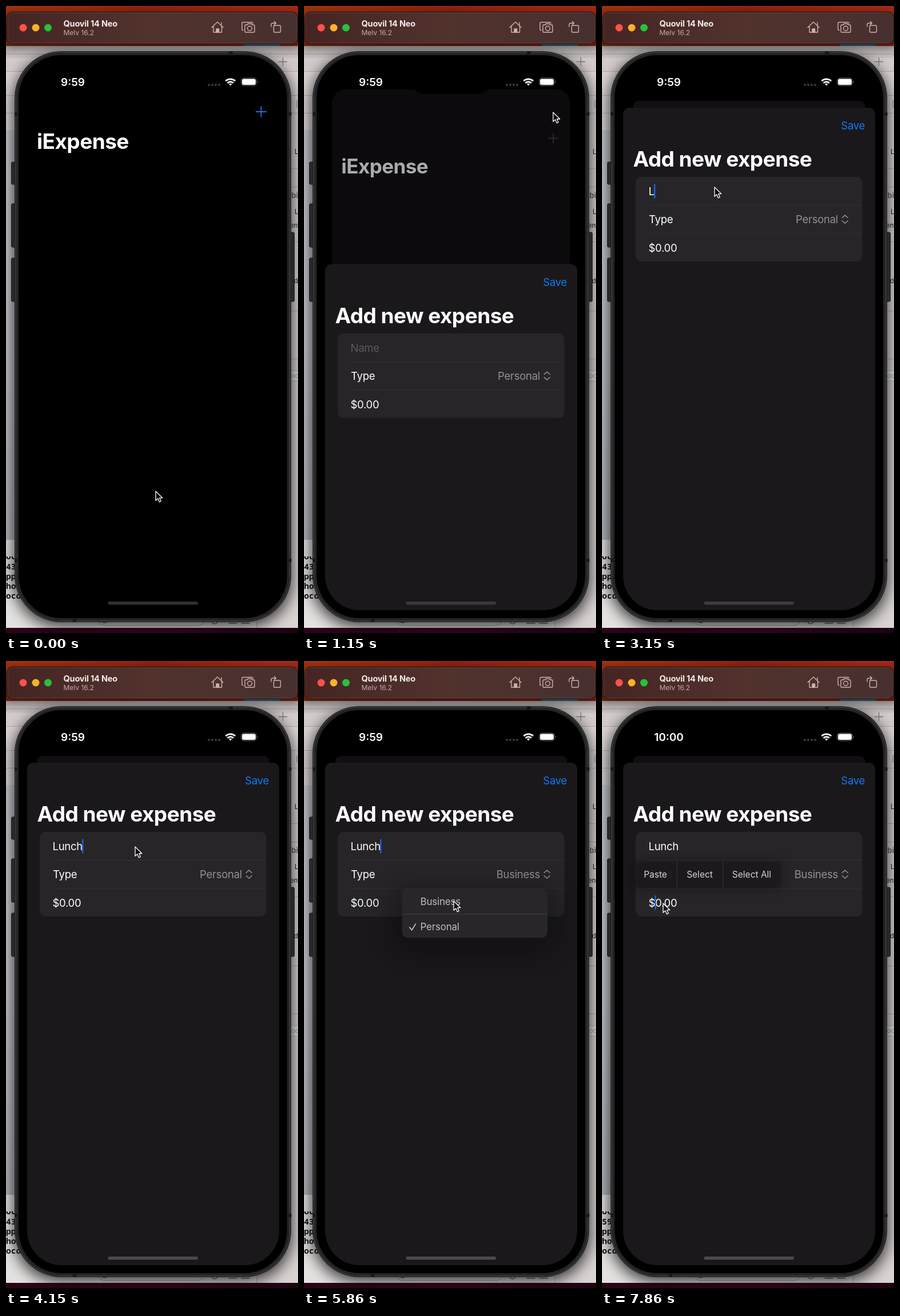
These frames come from a looping animation (511 by 1097 pixels, 8000 ms). An HTML page:

```html
<!DOCTYPE html>
<html lang="en">
<head>
<meta charset="utf-8">
<title>Expense form</title>
<style>
  html, body { margin: 0; width: 100%; height: 100%; overflow: hidden; background: #000; }
  svg { display: block; width: 511px; height: 1097px; font-family: Inter, Roboto, sans-serif; }
  .title { font-size: 37px; font-weight: 700; letter-spacing: -.0145em; fill: #fff; }
  .body { font-size: 18.5px; letter-spacing: -.015em; fill: #fff; }
  .edit { font-size: 15.5px; fill: #d6d5d8; text-anchor: middle; }
  .log { font: 700 14.5px "Noto Sans Mono", "DejaVu Sans Mono", monospace; fill: #151515; }
  .side { font-size: 11.5px; fill: #1c1c1c; }
  .line { fill: none; stroke-linecap: round; stroke-linejoin: round; }
</style>
</head>
<body>
<svg viewBox="0 0 511 1097" xmlns="http://www.w3.org/2000/svg">
  <defs>
    <linearGradient id="wall"><stop stop-color="#a13310"/><stop offset=".5" stop-color="#8f220e"/><stop offset="1" stop-color="#a52a16"/></linearGradient>
    <linearGradient id="bar"><stop stop-color="#452523"/><stop offset=".5" stop-color="#51322d"/><stop offset="1" stop-color="#46302f"/></linearGradient>
    <linearGradient id="canvas" x2="0" y2="1"><stop stop-color="#c6c7ce"/><stop offset=".5" stop-color="#c4c5cc"/><stop offset="1" stop-color="#b4b5bc"/></linearGradient>
    <linearGradient id="dock"><stop stop-color="#2b0417"/><stop offset=".55" stop-color="#3a0620"/><stop offset="1" stop-color="#1c0413"/></linearGradient>
    <filter id="soft" x="-30%" y="-30%" width="160%" height="160%"><feGaussianBlur stdDeviation="13"/></filter>
    <filter id="glow" x="-40%" y="-100%" width="180%" height="300%"><feGaussianBlur stdDeviation="10"/></filter>
    <filter id="haze" x="-40%" y="-100%" width="180%" height="300%"><feGaussianBlur stdDeviation="24"/></filter>
    <clipPath id="screen"><rect x="37" y="101" width="441" height="956" rx="60"/></clipPath>
    <clipPath id="console"><rect y="963" width="60" height="100"/></clipPath>
  </defs>

  <!-- desktop and editor window behind -->
  <rect width="511" height="1097" fill="url(#wall)"/>
  <rect x="416" y="60" width="63" height="12" fill="#3f7592"/>
  <rect y="70" width="511" height="1019" fill="#d9d3d2"/>
  <rect y="84" width="511" height="30" fill="#d2cbc9"/>
  <rect y="217" width="60" height="717" fill="url(#canvas)"/>
  <rect y="934" width="438" height="155" fill="#e4e2e1"/>
  <rect y="1088" width="511" height="9" fill="url(#dock)"/>
  <path d="M0 83.5H511M0 114.5H511M0 156.5H511M0 187.5H511M490 284.5H511M490 316.5H511M490 412.5H511M490 533.5H511M490 617.5H511M438.5 1070V1088" stroke="#b3acab"/>
  <path d="M160 1070q2 14 14 14h160q14 0 14-14" class="line" stroke="#a9a4a3"/>
  <path d="M167 1076q4 5 9 2M360 1078q5 6 10 0M390 1080h14M412 1080h14" class="line" stroke="#666" stroke-width="1.4"/>
  <rect x="490" y="638" width="30" height="18" fill="#e6e2e2" stroke="#b9b3b3"/>
  <rect x="509" y="165" width="12" height="13" rx="3" fill="none" stroke="#777"/>
  <g class="side">
    <text x="505" y="259">L</text><text x="505" y="364">L</text>
    <text x="497" y="388">ent</text><text x="504" y="485">d</text>
    <text x="499.5" y="336" font-weight="700" style="font-size:13px;fill:#666">bi</text>
    <text x="499" y="651" style="fill:#999">oc</text>
  </g>
  <g class="log" clip-path="url(#console)">
    <text y="968">oc</text><text id="stamp" y="986"></text><text y="1003">pp</text><text y="1020">hoo</text><text y="1037">oco.</text>
  </g>

  <!-- shadows -->
  <rect x="13" y="86" width="488" height="1000" rx="82" opacity=".74" filter="url(#soft)"/>
  <rect x="-10" y="20" width="531" height="54" opacity=".62" filter="url(#soft)"/>
  <path d="M477 97.5h15M484.5 90v15" stroke="#756e6d" stroke-width="1.3"/>

  <!-- phone body -->
  <g fill="#29292b" stroke="#151515">
    <rect x="9.5" y="273" width="10" height="39" rx="2"/><rect x="9.5" y="346" width="10" height="76" rx="2"/>
    <rect x="9.5" y="441" width="10" height="76" rx="2"/><rect x="494" y="396" width="10.5" height="121" rx="2"/>
  </g>
  <rect x="15" y="79" width="484" height="999" rx="82" fill="#1a1a1b"/>
  <rect x="17" y="81" width="480" height="995" rx="80" fill="#000" stroke="#39393b" stroke-width="2"/>
  <rect x="20" y="84" width="474" height="989" rx="77" fill="#000" stroke="#242426" stroke-width="4"/>
  <path d="M390 82.5h7M117 1075h6M17.5 186v6M497 186v6M17.5 967v6M497 967v6" stroke="#171717" stroke-width="5"/>

  <!-- screen -->
  <g clip-path="url(#screen)">
    <g id="home">
      <rect id="homeCard" x="37" y="101" width="441" height="956"/>
      <g id="homeContent">
        <path id="plus" d="M437 185h19M446.5 175.500v19" stroke-width="1.9"/>
        <text id="homeTitle" class="title" x="54" y="250">iExpense</text>
      </g>
    </g>
    <g id="sheet">
      <rect x="37" y="178" width="441" height="900" rx="11" fill="#1a181b"/>
      <text class="body" x="460" y="216" text-anchor="end" style="fill:#0c7bf5">Save</text>
      <text class="title" x="54.5" y="281">Add new expense</text>
      <rect x="59" y="299" width="396.5" height="148" rx="10" fill="#272528"/>
      <path d="M82 348.5H455M82 398H455" stroke="#333135"/>
      <text id="name" class="body" x="81.5" y="331"></text>
      <text class="body" x="82" y="380">Type</text>
      <text id="kind" class="body" x="413" y="380" text-anchor="end" style="fill:#929196"></text>
      <path class="line" d="M420.200 370.500l5-4.400 5 4.400M420.200 375.800l5 4.400 5-4.400" stroke="#929196" stroke-width="1.5"/>
      <text id="amount" class="body" x="81.5" y="430">$0.00</text>
      <g id="picker">
        <rect x="140" y="395" width="310" height="125" rx="30" opacity=".3" filter="url(#haze)"/>
        <rect x="164" y="398" width="263" height="89.5" rx="11" fill="#29272a"/>
        <path d="M164 444.5H427" stroke="#434145"/>
        <g style="font-size:17.5px" fill="#c3c2c5" letter-spacing="-.2">
          <text x="197" y="428">Business</text><text x="197" y="474">Personal</text>
        </g>
        <path class="line" d="M177.500 468.500l4 5 7-11" stroke="#d0cfd2" stroke-width="1.7"/>
      </g>
      <g id="edit">
        <rect x="56" y="350" width="260" height="48" rx="10" opacity=".3" filter="url(#glow)"/>
        <rect x="58" y="351" width="255" height="46" rx="9" fill="#1c1a1d" opacity=".95"/>
        <path d="M131.500 351v46M211.500 351v46" stroke="#333135"/>
        <g class="edit"><text x="93.5" y="379">Paste</text><text x="171" y="379">Select</text><text x="262" y="379">Select All</text></g>
      </g>
      <rect id="caret" width="2.3" height="25" rx="1" fill="#1769e0"/>
    </g>
    <rect x="190" y="117" width="135" height="36.5" rx="18" fill="#000"/>
    <rect id="indicator" x="178.5" y="1042" width="157.5" height="5.5" rx="2.7"/>
  </g>

  <!-- status bar -->
  <text id="clock" x="117" y="140" text-anchor="middle" font-size="19" font-weight="600" fill="#fff"></text>
  <g fill="#3b3b3d"><circle cx="355" cy="138" r="2"/><circle cx="361" cy="138" r="2"/><circle cx="367" cy="138" r="2"/><circle cx="373" cy="138" r="2"/></g>
  <g fill="none" stroke="#fff" stroke-width="2.7">
    <path d="M384.400 131.300a12 12 0 0 1 16.700 0M387.600 134.700a7.500 7.500 0 0 1 10.300 0"/>
    <path d="M390 136.300q2.700-1.800 5.400 0l-2.700 3.200z" fill="#fff" stroke="none"/>
  </g>
  <rect x="411.5" y="126" width="27" height="13.5" rx="4.2" fill="none" stroke="#646466"/>
  <rect x="413" y="127.5" width="24" height="10.5" rx="3" fill="#fff"/>
  <path d="M440 130.500q2 2.200 0 4.500z" fill="#646466"/>

  <!-- simulator toolbar -->
  <rect x="2" y="10.5" width="508" height="55.5" rx="10" fill="url(#bar)" stroke="#2a1413" stroke-width="1.5"/>
  <rect x="3" y="11.5" width="506" height="53.5" rx="9" fill="none" stroke="#76544f" stroke-opacity=".6"/>
  <circle cx="30" cy="38" r="6.5" fill="#fe524b"/><circle cx="52" cy="38" r="6.5" fill="#fdb225"/><circle cx="73.5" cy="38" r="6.5" fill="#25c339"/>
  <text x="100.5" y="36" font-size="14.5" font-weight="700" letter-spacing="-.2" fill="#f4eceb">Quovil 14 Neo</text>
  <text x="100.5" y="51" font-size="12" fill="#c3aca8">Melv 16.2</text>
  <g class="line" stroke="#d0b1ac" stroke-width="1.4">
    <path d="M360 37.500l10-9.500 10 9.500M363 35.500v10.500h14.500v-10.500M377 34v-5"/>
    <path d="M368 46v-6h4.500v6z" fill="#d0b1ac"/>
    <path d="M415 42.500q-2 0-2-2v-10q0-2 2-2h15q2 0 2 2"/>
    <path d="M419 33h3l1.500-2h6l1.500 2h2.500q1.500 0 1.500 1.500v10q0 1.500-1.500 1.500h-14q-1.500 0-1.500-1.500v-10q0-1.500 1.500-1.500z"/>
    <circle cx="426.500" cy="39.3" r="4"/>
    <rect x="468.5" y="34" width="12" height="12" rx="1.5"/>
    <path d="M464 36v-3q0-3 3-3h5M469.500 27l3 3-3 3"/>
  </g>

  <path id="cursor" d="M0 0V16.200L3.800 12.700 6.300 18.800 9.200 17.500 6.700 11.700H11.800Z" fill="#080808" stroke="#fff" stroke-width="1.3" stroke-linejoin="round"/>
</svg>
<script>
  const LOOP = 8000, RATE = 7;
  const el = {};
  document.querySelectorAll('svg [id]').forEach(node => el[node.id] = node);
  const set = (node, attrs) => Object.entries(attrs).forEach(([key, value]) => node.setAttribute(key, value));
  const write = (node, text) => { if (node.textContent !== text) node.textContent = text; };
  const lerp = (a, b, p) => a + (b - a) * p;
  const clamp = p => Math.max(0, Math.min(1, p));
  const mix = (a, b, p) => `rgb(${a.map((v, i) => Math.round(lerp(v, b[i], p)))})`;

  // Critically damped spring from 0 to 1
  const spring = (t, start, speed) => {
    const x = Math.max(0, t - start) / 1000 * speed;
    return 1 - (1 + x) * Math.exp(-x);
  };

  // Pointer stops: time, x, y
  const stops = [
    [130, 262, 849], [720, 436, 186], [1140, 436, 186], [1570, 264, 390],
    [1990, 197, 317], [3990, 197, 317], [4570, 366, 364], [5150, 366, 364],
    [5570, 262, 420], [5880, 262, 420], [6430, 134, 422], [6990, 134, 422],
    [7290, 107, 424], [8000, 107, 424]
  ];
  function pointer(t) {
    const i = stops.findIndex(stop => stop[0] > t);
    if (i < 1) return stops[0].slice(1);
    const [t0, x0, y0] = stops[i - 1], [t1, x1, y1] = stops[i];
    const u = (t - t0) / (t1 - t0), p = u * u * (3 - 2 * u);
    return [lerp(x0, x1, p), lerp(y0, y1, p)];
  }

  const keyTimes = [3130, 3270, 3420, 3560, 3700];

  function drawHome(p) {
    const scale = lerp(1, .92, p), top = lerp(101, 166, p);
    set(el.home, { transform: `translate(257.5 ${top}) scale(${scale}) translate(-257.5 -101)` });
    set(el.homeCard, { rx: lerp(62, 10, p), fill: mix([0, 0, 0], [18, 15, 19], p) });
    set(el.homeContent, { transform: `translate(0 ${9.5 * p})` });
    set(el.plus, { stroke: mix([31, 112, 218], [42, 41, 44], clamp(p * 1.5)) });
    el.homeTitle.style.fill = mix([255, 255, 255], [132, 131, 133], p);
  }

  function drawCaret(t) {
    const inAmount = t > 6400;
    const field = inAmount ? el.amount : el.name;
    const count = inAmount ? (t > 7400 ? 1 : 5) : keyTimes.filter(k => k <= t).length;
    const width = count ? field.getSubStringLength(0, count) : 0;
    set(el.caret, {
      x: 81.5 + width - .8,
      y: inAmount ? 410 : 311.5,
      opacity: t > 2250 ? 1 : 0
    });
  }

  function drawPicker(t) {
    const open = spring(t, 4950, 22) * (1 - spring(t, 5830, 22));
    const scale = 1.064 * lerp(.25, 1, open);
    set(el.picker, {
      transform: `translate(400 390) scale(${scale}) translate(-400 -390)`,
      opacity: open < .01 ? 0 : clamp(open * 1.1)
    });
  }

  function draw(time) {
    const t = Math.floor(time * RATE / 1000 + .035) * 1000 / RATE;
    const present = spring(t, 1000, 16.7);
    drawHome(present);
    set(el.sheet, { transform: `translate(0 ${879 * (1 - present)})` });

    const typed = keyTimes.filter(k => k <= t).length;
    write(el.name, typed ? 'Lunch'.slice(0, typed) : 'Name');
    el.name.style.fill = typed ? '#fff' : '#5b5a5e';
    write(el.kind, t > 5830 ? 'Business' : 'Personal');
    write(el.clock, t > 6100 ? '10:00' : '9:59');
    write(el.stamp, t > 6400 ? '59' : '43');
    drawCaret(t);
    drawPicker(t);
    set(el.edit, { opacity: clamp((t - 7560) / 290) });
    set(el.indicator, { fill: mix([48, 48, 48], [74, 73, 76], present * (t > 4000 ? 1 : .5)) });
    set(el.cursor, { transform: `translate(${pointer(t)})` });
  }

  const begin = performance.now();
  function tick() {
    draw((performance.now() - begin) % LOOP);
    requestAnimationFrame(tick);
  }
  tick();
</script>
</body>
</html>
```
